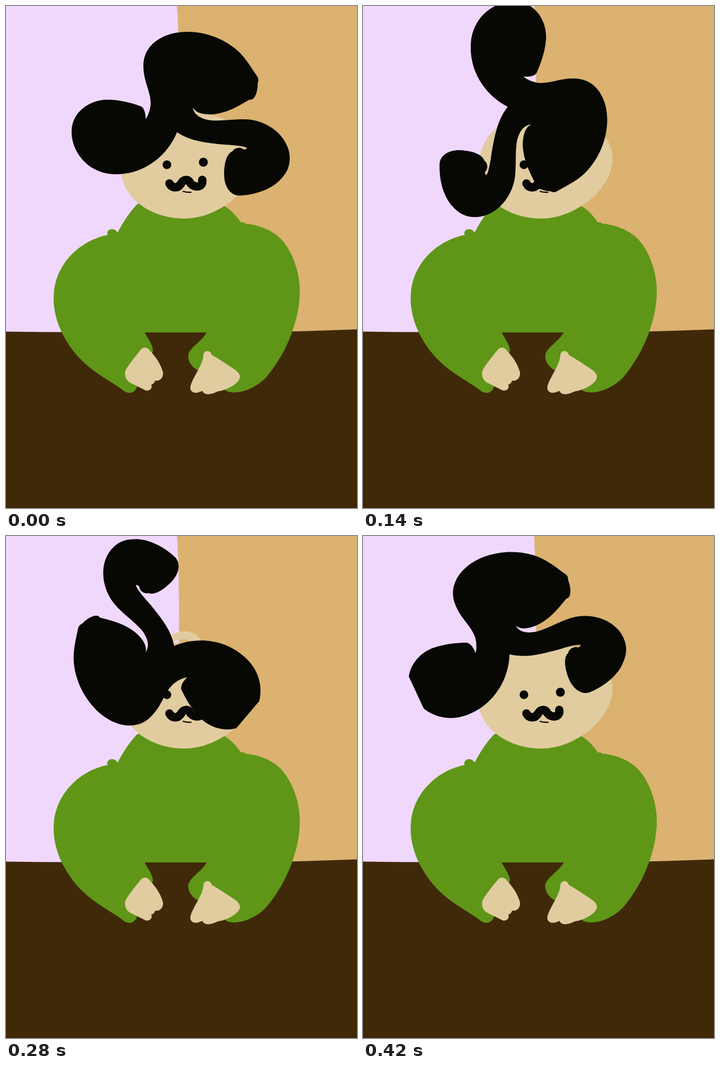
Animation, 626 px wide and 895 px high, one loop 490 ms. Source, as an HTML page:

```html
<!DOCTYPE html>
<html lang="en">
<head>
<meta charset="utf-8">
<title>Spinning hair</title>
<style>
  html, body { margin: 0; width: 100%; height: 100%; overflow: hidden; background: #3f2909; }
  svg { display: block; width: 100%; height: 100%; }
  .skin { fill: #e1cca0; }
  .shirt { fill: #5f9617; }
  .ink { fill: #070704; }
  .line { fill: none; stroke: #070704; stroke-linecap: round; }
</style>
</head>
<body>
<svg viewBox="0 0 626 895">
  <defs>
    <!-- trims the curl that has left the top of the stage -->
    <clipPath id="trim"><path d="M106.4 0H700V500H147.5Z"/></clipPath>
  </defs>

  <!-- wall and table -->
  <rect width="626" height="600" fill="#f0d8fc"/>
  <path fill="#dbb270" d="M305 0Q308.500 50 308.500 140V600H626V0Z"/>
  <path fill="#3f2909" d="M0 580.500Q60 581.500 120 581.500H440Q540 580 626 576.500V895H0Z"/>

  <!-- jumper -->
  <path class="shirt" d="M240 352C234 351 231 357 228 360C216 374 207 389 199 404
    C195 397 188 396 183 400C180 403 180 407 182 408C132 418 85 460 85 522
    C85 565 109 610 145 641C166 659 190 671 206 683C212 689 219 691 225 689
    C231 686 232 682 234 678L262 615C263 607 254 594 247 582H358
    C349 599 325 610 325 624C325 637 334 645 343 650L394 687
    C416 694 446 681 464 662C499 621 524 562 524 508C524 473 510 436 490 415
    C473 398 449 390 427 388C424 385 421 385 419 386C410 373 400 362 388 356Z"/>

  <!-- hands -->
  <path class="skin" d="M241 612C232 623 218 640 213 650C211 658 213 665 219 670
    C229 676 240 680 248 685C256 688 262 681 259 675Q264 674 266 668
    C275 669 281 662 280 653C276 638 266 624 257 615C253 608 246 607 241 612Z"/>
  <path class="skin" d="M352 622C352 639 334 660 329 678C327 688 336 691 343 689
    Q347 688 350 686C354 695 366 693 378 687C393 685 410 676 416 666
    C421 656 410 649 397 641C385 633 376 627 367 622C365 613 353 613 352 622Z"/>

  <!-- head -->
  <path class="skin" fill-rule="evenodd" d="M280 196C288 177 302 170 319 170C337 170 349 180 349 196Z
    M291 192.500C303 184 322 181 332 188.500V196H291Z"/>
  <path class="skin" d="M318 379C260 379 205 343 205 291C205 255 226 205 290 191.500
    Q312 188 332 189.500L350 191C400 198 445 228 445 272C445 325 380 379 318 379Z"/>
  <circle class="ink" cx="287" cy="283" r="7.700"/>
  <circle class="ink" cx="352" cy="278.500" r="8"/>
  <path class="line" stroke-width="15" d="M291.500 316.500C296 325 306 326 312 317C317 308 325 308 329 316C335 324 352 325 350 310"/>
  <path class="line" stroke-width="2.200" d="M316 330.500Q322 332.500 330 332"/>

  <g id="hair">
    <path id="curls" class="ink" d="M333 181C339 191 352 194 370 193C397 190 417 177 434 167
      C443 169 449 155 449 137Q452 130 447 124C435 106 424 87 405 73C382 56 353 46 323 46
      C282 46 245 68 245 106C245 136 258 150 258 175Q257 190 249 202
      Q249 184 241 179C225 173 202 167 182 167C153 166 117 187 117 224
      C117 262 148 300 196 300C250 300 290 263 305 225
      C330 242 360 244 388 247Q428 249 430 254Q427 256 424 256
      C418 250 407 253 404 259C392 264 389 284 389 300C389 323 401 338 416 338
      C441 337 469 329 487 312C499 300 506 289 506 271C506 235 468 202 425 202
      C401 202 388 205 367 204C348 202 335 194 333 181Z"/>
  </g>
</svg>
<script>
  const STEP = 70;
  const TRIM_FROM = 3;
  const PIVOT = [381.5, 217.5];
  // pivot x, pivot y, turn in degrees
  const POSES = [
    [381.5, 217.5, 0],
    [352.5, 253.5, 36.3],
    [259.5, 256.5, 94.7],
    [213, 197, 156.3],
    [240.5, 147, 225],
    [282.5, 120.5, 281.3],
    [330.5, 177.5, 339.7]
  ];
  const hair = document.getElementById('hair');
  const curls = document.getElementById('curls');
  const start = performance.now();

  function draw(time) {
    const step = Math.floor(Math.max(0, time) / STEP) % POSES.length;
    const [x, y, turn] = POSES[step];
    hair.setAttribute('transform',
      `translate(${x} ${y}) rotate(${turn}) translate(${-PIVOT[0]} ${-PIVOT[1]})`);
    curls.setAttribute('clip-path', step < TRIM_FROM ? 'none' : 'url(#trim)');
  }

  function tick(now) {
    draw(now - start);
    requestAnimationFrame(tick);
  }

  draw(0);
  requestAnimationFrame(tick);
</script>
</body>
</html>
```
